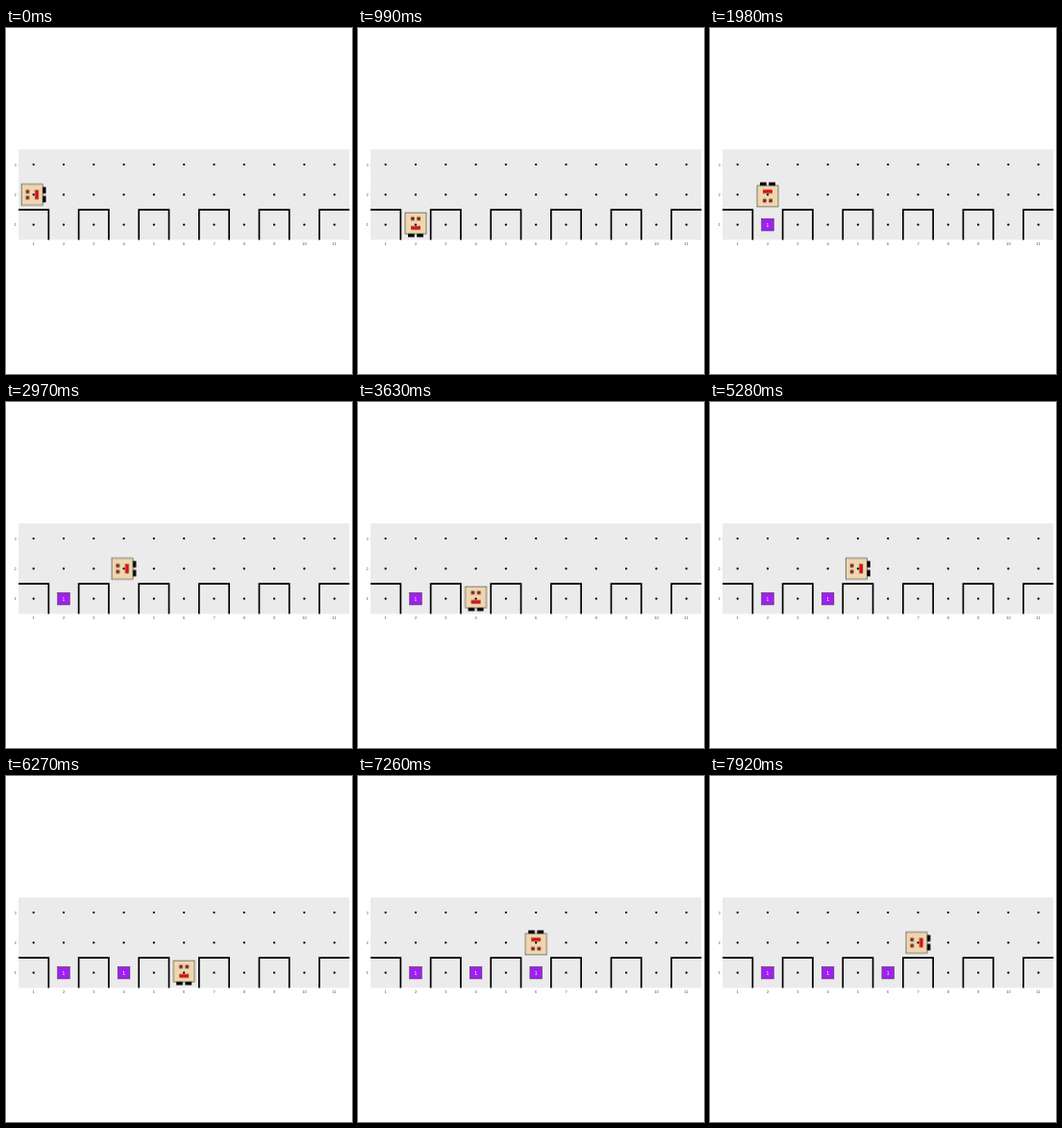
An HTML page without scripts for the animation above (8 s loop, 360 by 360 pixels).

```html
<!DOCTYPE html>
<html lang="en">
<head>
<meta charset="utf-8">
<title>Robot placing markers</title>
<style>
  html, body { margin: 0; width: 100%; height: 100%; overflow: hidden; background: #fff; }
  svg { display: block; width: 100vw; height: 100vh; }
  text { font-family: "Liberation Sans", Arial, sans-serif; text-anchor: middle; }
  .axis { font-size: 4px; fill: #4d4d4d; }
  .beeper rect { fill: #a020f0; stroke: #333; stroke-width: .5; }
  .beeper text { font-size: 5px; fill: #fff; }

  /* One step is 330 ms = 4.125% of the loop; every pose change is hard. */
  .col, .row, .turn, .beeper { animation: 8s step-end -1ms infinite; }
  .col { animation-name: col; }
  .row { animation-name: row; }
  .turn { animation-name: turn; }
  .b1 { animation-name: drop1; }
  .b2 { animation-name: drop2; }
  .b3 { animation-name: drop3; }

  @keyframes col {
    0% { transform: translateX(28.7px); }
    4.125% { transform: translateX(60px); }
    33% { transform: translateX(91.3px); }
    37.125% { transform: translateX(122.6px); }
    66% { transform: translateX(153.9px); }
    70.125% { transform: translateX(185.2px); }
    99%, 100% { transform: translateX(216.5px); }
  }
  @keyframes row {
    0%, 24.75%, 57.75%, 90.75%, 100% { transform: translateY(173.4px); }
    12.375%, 45.375%, 78.375% { transform: translateY(204.7px); }
  }
  @keyframes turn {
    0%, 28.875%, 61.875%, 94.875%, 100% { transform: rotate(0deg); }
    8.25%, 41.25%, 74.25% { transform: rotate(90deg); }
    20.625%, 53.625%, 86.625% { transform: rotate(-90deg); }
  }
  @keyframes drop1 { 0% { visibility: hidden; } 16.5%, 100% { visibility: visible; } }
  @keyframes drop2 { 0% { visibility: hidden; } 49.5%, 100% { visibility: visible; } }
  @keyframes drop3 { 0% { visibility: hidden; } 82.5%, 100% { visibility: visible; } }
</style>
</head>
<body>
<svg viewBox="0 0 360 360">
  <rect x="13.05" y="126.4" width="344.3" height="94" fill="#ebebeb"/>

  <!-- walls -->
  <path fill="none" stroke="#000" stroke-width="1.7" d="M13.05 189.1h31.3v31.3
    m31.3 0v-31.3h31.3v31.3 m31.3 0v-31.3h31.3v31.3 m31.3 0v-31.3h31.3v31.3
    m31.3 0v-31.3h31.3v31.3 m31.3 0v-31.3h31.3"/>

  <g class="axis">
    <text x="28.7" y="225.6">1</text>
    <text x="60" y="225.6">2</text>
    <text x="91.3" y="225.6">3</text>
    <text x="122.6" y="225.6">4</text>
    <text x="153.9" y="225.6">5</text>
    <text x="185.2" y="225.6">6</text>
    <text x="216.5" y="225.6">7</text>
    <text x="247.8" y="225.6">8</text>
    <text x="279.1" y="225.6">9</text>
    <text x="310.4" y="225.6">10</text>
    <text x="341.7" y="225.6">11</text>
    <text x="9.7" y="206.2">1</text>
    <text x="9.7" y="174.9">2</text>
    <text x="9.7" y="143.6">3</text>
  </g>

  <!-- body and feet, facing east -->
  <g class="col"><g class="row"><g class="turn">
    <rect x="-12.5" y="-11" width="22" height="22" fill="#efd6ae" stroke="#333" stroke-width=".6"/>
    <path d="M9.5 -7.9h3.3v6.7h-3.3z M9.5 1.2h3.3v6.7h-3.3z"/>
  </g></g></g>

  <!-- grid dots -->
  <path fill="none" stroke="#000" stroke-width="2.3" stroke-linecap="round" stroke-dasharray="0 31.3"
    d="M28.7 142.1h313.2 M28.7 173.4h313.2 M28.7 204.7h313.2"/>

  <g transform="translate(60 204.7)"><g class="beeper b1">
    <rect x="-6.3" y="-6.3" width="12.6" height="12.6"/><text y="1.8">1</text>
  </g></g>
  <g transform="translate(122.6 204.7)"><g class="beeper b2">
    <rect x="-6.3" y="-6.3" width="12.6" height="12.6"/><text y="1.8">1</text>
  </g></g>
  <g transform="translate(185.2 204.7)"><g class="beeper b3">
    <rect x="-6.3" y="-6.3" width="12.6" height="12.6"/><text y="1.8">1</text>
  </g></g>

  <!-- face stays above the beepers -->
  <g class="col"><g class="row"><g class="turn" stroke="#333" stroke-width=".3">
    <path fill="#8b1a1a" d="M-7.9 -4.8h3.2v3.2h-3.2z M-7.9 1.6h3.2v3.2h-3.2z"/>
    <rect x="1.6" y="-4.8" width="3.4" height="9.6" fill="#e60d0d"/>
  </g></g></g>
</svg>
</body>
</html>
```
